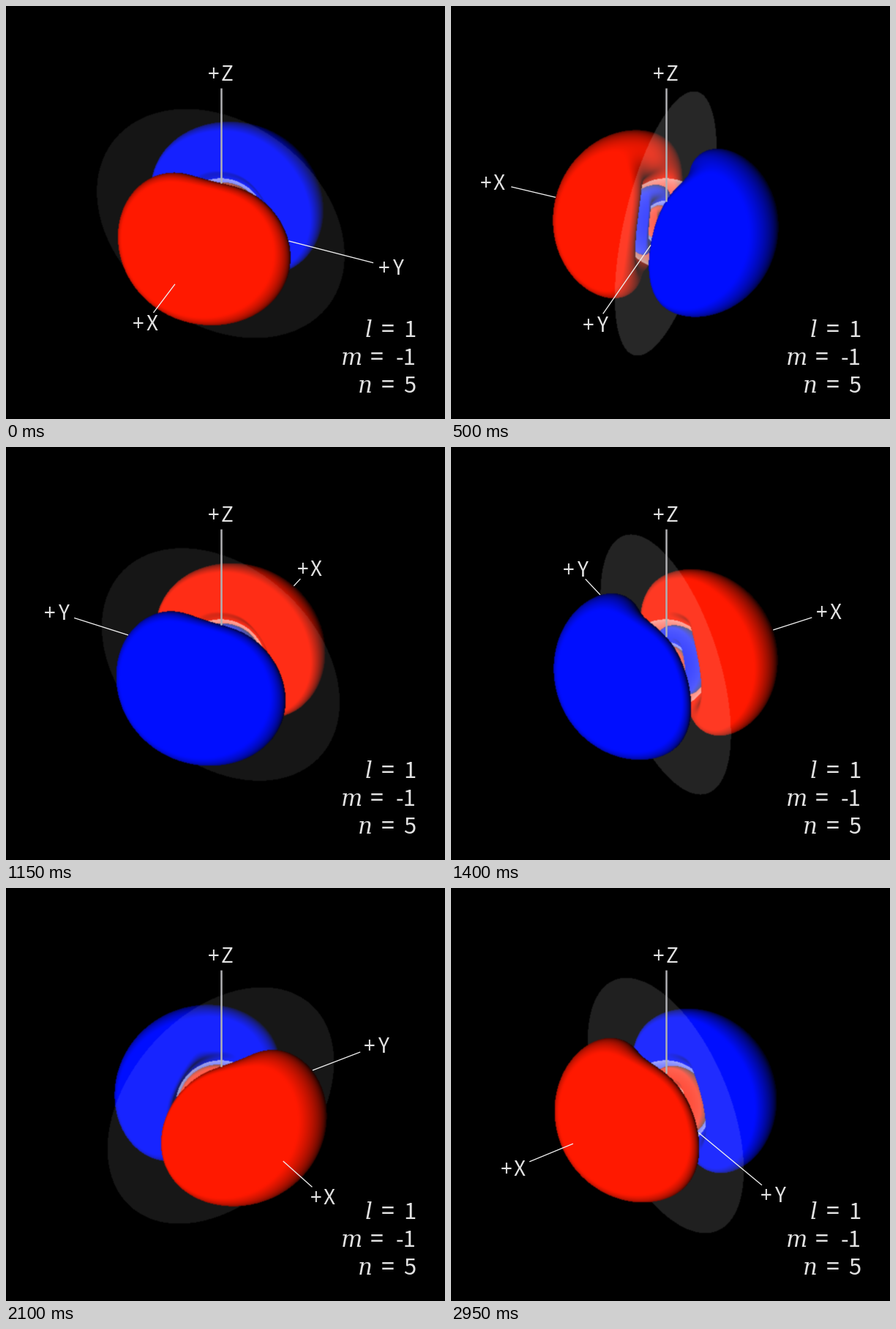
A matplotlib script for the animation above (3000 ms loop, 600 px wide and 564 px high).

```python
import numpy as np
import matplotlib.pyplot as plt
from matplotlib.animation import FuncAnimation
from matplotlib.patches import Polygon

W, H, FRAMES, STEP_MS = 600, 564, 60, 50
CX, CY = 293.5, 297.0
TILT = np.arcsin(0.584)
SE, CE = np.sin(TILT), np.cos(TILT)

# 5p orbital weighted by r and sin(polar angle)**POLAR
SCALE, ISO, POLAR = 5.85, 1.65, 0.8
REACH, DISC_R, AXIS_R, LABEL_R = 158, 185, 228, 255
NODES = (2.14, 5.32, 10.54)
RED, BLUE = np.array([255, 25, 0]), np.array([0, 14, 255])
LIGHT = np.array([-0.25, -0.1, 0.963])

# radial part and its slope as lookup tables
RES = 200
rho = np.arange(0, 31, 1 / RES)
radial = -rho * np.exp(-rho / 2) * (20 - 15 * rho + 3 * rho**2 - rho**3 / 6)
slope = np.gradient(radial, rho).astype(np.float32)
radial = radial.astype(np.float32)

# turntable angle in degrees over time
KEY_T = [0, 500, 900, 1100, 1400, 1750, 2200, 2450, 2750, 2950]
KEY_A = [-23.8, -112.1, -168.2, -202, -241.2, -289.2, -337.5, -366.8,
         -393.6, -414.8]

cols, rows = np.meshgrid(np.arange(W) + 0.5, np.arange(H) + 0.5)
U = (cols - CX).astype(np.float32)
V = (CY - rows).astype(np.float32)
BALL = U**2 + V**2 < REACH**2
BU, BV = U[BALL], V[BALL]
BW = np.sqrt(REACH**2 - BU**2 - BV**2)


def camera(frame):
    a = np.radians(np.interp(frame * STEP_MS, KEY_T, KEY_A))
    s, c = np.sin(a), np.cos(a)
    return np.array([[s, c, 0],
                     [-SE * c, SE * s, CE],
                     [CE * c, -CE * s, SE]], dtype=np.float32)


def to_world(cam, u, v, w):
    return [cam[0, k] * u + cam[1, k] * v + cam[2, k] * w for k in range(3)]


def solid(x, y, z):
    flat = x * x + y * y
    square = flat + z * z + np.float32(1e-3)
    r = np.sqrt(square) / SCALE
    value = x / SCALE * radial[(r * RES).astype(np.int32)]
    return np.abs(value) * (flat / square)**np.float32(POLAR / 2) > ISO


def march(cam, step=4.0):
    """Depth of the first surface met by each ray, -1e9 for none."""
    base = np.stack(to_world(cam, BU, BV, 0))
    ray = cam[2][:, None]
    depth = np.full(BU.size, -1e9, np.float32)
    live, w, p = np.arange(BU.size), BW.copy(), base
    while live.size:
        hit = solid(*(p + ray * w))
        depth[live[hit]] = w[hit]
        w = w - np.float32(step)
        keep = ~hit & (w > -BW[live])
        live, w, p = live[keep], w[keep], p[:, keep]
    found = np.flatnonzero(depth > -1e8)
    lo, p = depth[found], base[:, found]
    hi = lo + np.float32(step)
    for _ in range(6):
        mid = (lo + hi) / 2
        inside = solid(*(p + ray * mid))
        lo, hi = np.where(inside, mid, lo), np.where(inside, hi, mid)
    depth[found] = lo
    return depth, found


def shade(cam, *point):
    x, y, z = q = np.stack(point) / SCALE
    r = np.sqrt((q * q).sum(0)) + 1e-3
    i = (r * RES).astype(np.int32)
    value = radial[i]
    sign = np.sign(x * value)
    grad = x * (slope[i] - POLAR * value / r) * q / r
    grad[:2] += x * POLAR * value * q[:2] / (x * x + y * y + 1e-3)
    grad[0] += value
    normal = -sign * grad
    normal /= np.linalg.norm(normal, axis=0) + 1e-9
    light = np.clip(1.35 * (LIGHT @ cam @ normal) + 0.3, 0.12, 1)
    return np.where(sign[:, None] > 0, RED, BLUE) * light[:, None]


def veil(cam, depth):
    """Share of light let through by the nodal plane and nodal spheres."""
    clear = np.ones((H, W), np.float32)
    s, c = cam[0, 0], cam[0, 1]
    facing = CE * c if abs(c) > 1e-3 else 1e-3
    w = (SE * c * V - s * U) / facing
    _, y, z = to_world(cam, U, V, w)
    shown = (y**2 + z**2 < DISC_R**2) & (w > depth)
    clear[shown] *= 1 - (0.205 - 0.165 * abs(facing))

    for node in NODES:
        size = node * SCALE
        root = size**2 - U**2 - V**2
        inside = root > 0
        root = np.sqrt(np.maximum(root, 0))
        alpha = 0.4 - 0.32 * root / size
        for side in (-1, 1):
            shown = inside & (side * root > depth)
            clear[shown] *= 1 - alpha[shown]
    return clear


def soften(im):
    for ax in (0, 1):
        im = (np.roll(im, 1, ax) + 3 * im + np.roll(im, -1, ax)) / 5
    return im


def render(cam):
    found_depth, found = march(cam)
    colour = np.zeros((BU.size, 3))
    colour[found] = shade(cam, *to_world(cam, BU[found], BV[found],
                                         found_depth[found]))
    image = np.zeros((H, W, 3))
    depth = np.full((H, W), -1e9, np.float32)
    image[BALL], depth[BALL] = colour, found_depth
    image = 255 - (255 - image) * veil(cam, depth)[..., None]
    return np.clip(soften(image), 0, 255).astype(np.uint8), depth


fig = plt.figure(figsize=(W / 100, H / 100), dpi=100, facecolor="black")
ax = fig.add_axes([0, 0, 1, 1])
ax.set_axis_off()
picture = ax.imshow(np.zeros((H, W, 3), np.uint8), extent=(0, W, H, 0),
                    interpolation="nearest", aspect="auto")
ax.set(xlim=(0, W), ylim=(H, 0))


def write(x, y, text, px, ha="center", font="Noto Sans CJK JP", **kw):
    return ax.text(x, y, text, fontsize=px * 0.72, family=font, ha=ha,
                   va="baseline", color="#e2e2e2", zorder=4, **kw)


lines = [ax.plot([], [], color=col, lw=lw, solid_capstyle="butt")[0]
         for col, lw in (("#eeeeee", 0.95), ("#eeeeee", 0.95),
                         ("#b0b0b4", 1.8))]
labels = [(write(0, 0, "+", 28), write(0, 0, name, 28)) for name in "XYZ"]

for base, name, right, equal, value in ((452, "l", 501, 521.5, "1"),
                                        (490, "m", 487, 507, "-1"),
                                        (528, "n", 501, 521.5, "5")):
    write(right, base, name, 31, "right", "DejaVu Serif", style="italic")
    write(equal, base, "=", 32)
    write(560, base, value, 31, "right")

arm = np.array([(3, -3), (3, -20), (13, -20), (0, -35), (-13, -20), (-3, -20)])
parts = [arm]
for _ in range(3):
    parts.append(parts[-1] @ np.array([[0, -1], [1, 0]]))
CURSOR = np.concatenate(parts)
cursor = ax.add_patch(Polygon(CURSOR, fc="white", ec="none", zorder=5,
                              visible=False))


def place_cursor(frame):
    k = frame - 18
    cursor.set_visible(-2 <= k <= 1)
    cursor.set_xy(CURSOR + (328.5 + 133 * k, 503.5 + 7 * k * k))


def draw(frame):
    cam = camera(frame)
    image, depth = render(cam)
    picture.set_data(image)
    t = np.linspace(0, AXIS_R, 2 * AXIS_R + 1)
    for k in range(3):
        dx, dy, dz = cam[0, k], -cam[1, k], cam[2, k]
        x, y = CX + t * dx, CY + t * dy
        hidden = depth[y.astype(int), x.astype(int)] > t * dz + 1
        lines[k].set_data(np.where(hidden, np.nan, x), y)
        lx, ly = CX - 0.5 + LABEL_R * dx, CY + LABEL_R * dy + 10
        if k == 2:
            ly += 2
        plus, letter = labels[k]
        plus.set_position((lx - 9.5, ly))
        letter.set_position((lx + 9, ly))
    place_cursor(frame)
    return [picture, cursor, *lines]


anim = FuncAnimation(fig, draw, frames=FRAMES, interval=STEP_MS, repeat=True)
plt.show()
```
